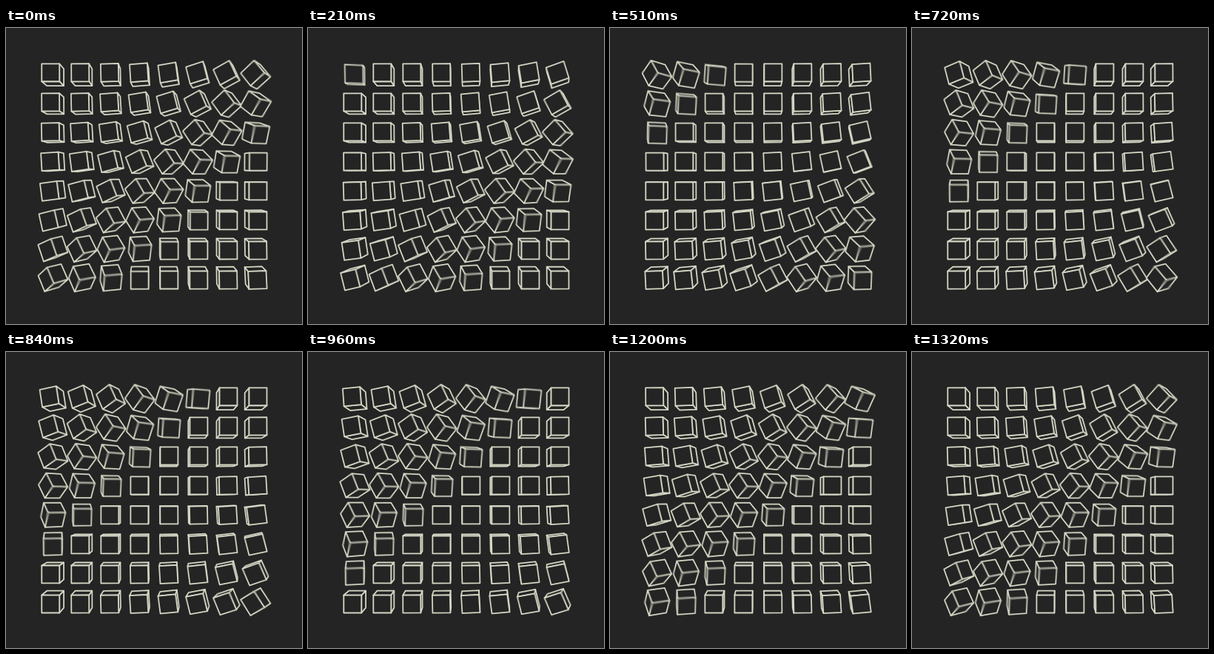
An HTML page with a canvas that plays this animation: 400x400 px, repeating every 1350 ms.

```html
<!DOCTYPE html>
<html>
<head>
<meta charset="utf-8">
<style>
  html, body { margin: 0; width: 100%; height: 100%; overflow: hidden; background: #242424; }
  canvas { display: block; width: 400px; height: 400px; }
</style>
</head>
<body>
<canvas id="stage" width="400" height="400"></canvas>
<script>
const SIZE = 400, CENTER = 200.4, LOOP = 1350, STEP = 30;
const COUNT = 8, SPACING = 39.1, HALF = 11.7, CAMERA = 500;
const START = 155, DELAY = 120;
const SAMPLES = 12, SHUTTER = 60, SHUTTER_LEAD = 15;
const BACK = '#242424', LINE = '#d6d7c6';
const CORNERS = [[-1, -1], [1, -1], [1, 1], [-1, 1]];

const view = document.getElementById('stage').getContext('2d');
const layer = document.createElement('canvas');
layer.width = layer.height = SIZE;
const ctx = layer.getContext('2d');

// Short ramp-up, long settle; returns the part still to turn.
const remaining = t => (1 - t ** 1.2) ** 3.8;

// Spin about the cube's own z axis, then about the vertical axis.
function rotate([x, y, z], c, s) {
  const spun = x * c + y * s;
  return [spun * c - z * s, y * c - x * s, spun * s + z * c];
}

function project([x, y, z], cx, cy) {
  const scale = CAMERA / (CAMERA - z);
  return [CENTER + (cx + x) * scale, CENTER + (cy + y) * scale];
}

function drawCube(cx, cy, angle) {
  const c = Math.cos(angle), s = Math.sin(angle);
  for (let axis = 0; axis < 3; axis++) {
    for (const side of [-1, 1]) {
      const normal = [0, 0, 0];
      normal[axis] = side;
      const [nx, ny, nz] = rotate(normal, c, s);
      if (nz * CAMERA - nx * cx - ny * cy <= HALF) continue;
      ctx.beginPath();
      for (const [u, v] of CORNERS) {
        const corner = [0, 0, 0];
        corner[axis] = side * HALF;
        corner[(axis + 1) % 3] = u * HALF;
        corner[(axis + 2) % 3] = v * HALF;
        ctx.lineTo(...project(rotate(corner, c, s), cx, cy));
      }
      ctx.closePath();
      ctx.fill();
      ctx.stroke();
    }
  }
}

function drawGrid(time) {
  ctx.fillStyle = BACK;
  ctx.strokeStyle = LINE;
  ctx.lineWidth = 1.8;
  ctx.lineJoin = 'round';
  ctx.fillRect(0, 0, SIZE, SIZE);
  const middle = (COUNT - 1) / 2;
  for (let row = 0; row < COUNT; row++) {
    for (let col = 0; col < COUNT; col++) {
      const local = time - START - DELAY * (row + col);
      const progress = (local / LOOP % 1 + 1) % 1;
      const angle = Math.PI / 2 * remaining(progress);
      drawCube((col - middle) * SPACING, (row - middle) * SPACING, angle);
    }
  }
}

// Average several moments to get motion blur.
function render(time) {
  for (let i = 0; i < SAMPLES; i++) {
    drawGrid(time - SHUTTER_LEAD + SHUTTER * (i + 0.5) / SAMPLES);
    view.globalAlpha = 1 / (i + 1);
    view.drawImage(layer, 0, 0);
  }
}

let origin, shown;
function tick(now) {
  origin ??= now;
  const time = Math.floor((now - origin) % LOOP / STEP) * STEP;
  if (time !== shown) render(shown = time);
  requestAnimationFrame(tick);
}
render(0);
requestAnimationFrame(tick);
</script>
</body>
</html>
```
